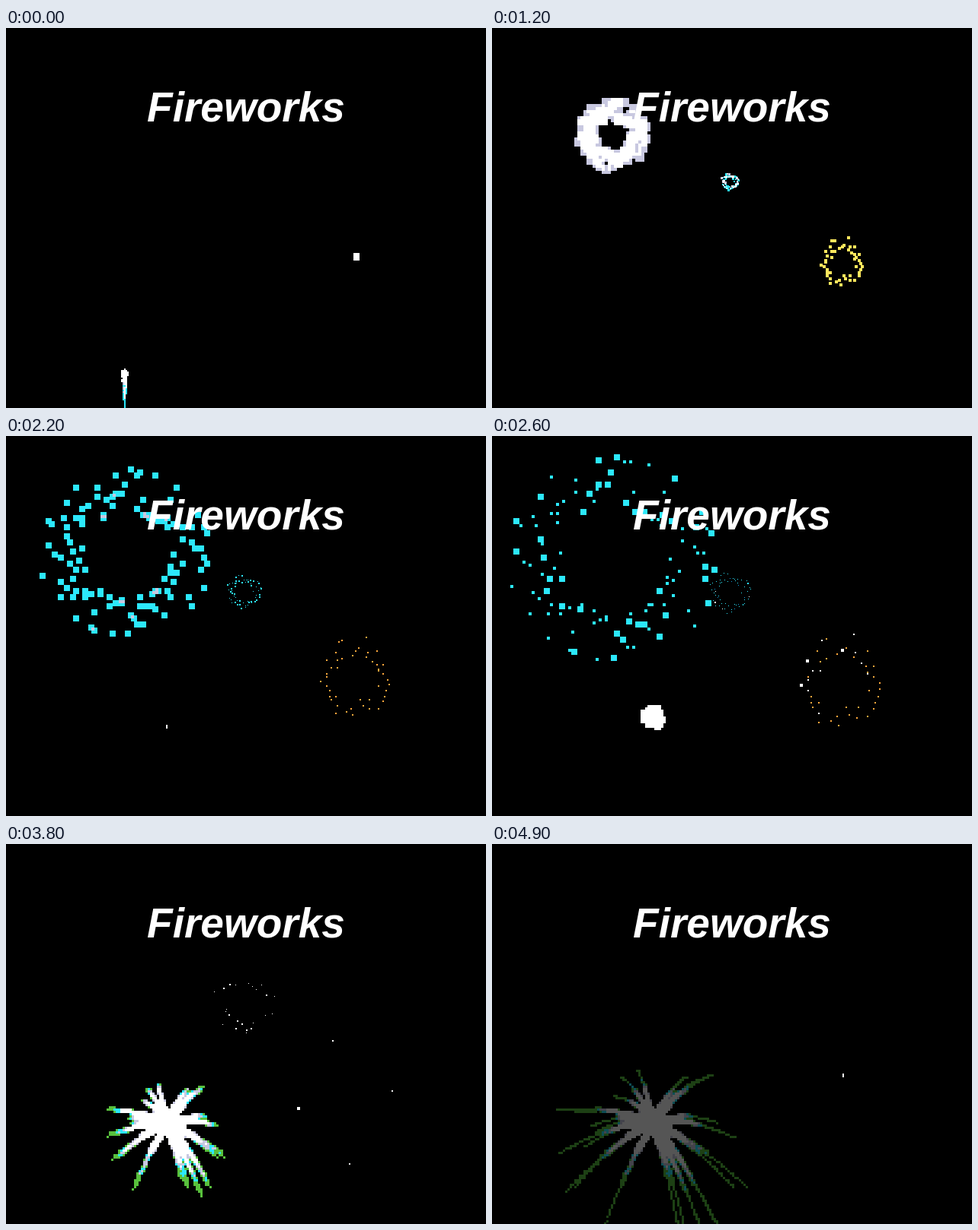
Recreate the animation shown at these times as an HTML page with a canvas. Size 630 px wide and 500 px high, loop 5 s.

```html
<!DOCTYPE html>
<html lang="en">
<head>
<meta charset="utf-8">
<title>Fireworks</title>
<style>
html, body { margin: 0; width: 100%; height: 100%; overflow: hidden; background: #000; }
canvas { display: block; }
</style>
</head>
<body>
<canvas id="stage" width="630" height="500"></canvas>
<script>
const ctx = document.getElementById('stage').getContext('2d');
const LOOP = 5000, STEP = 100;
const WHITE = '#ffffff', LAVENDER = '#c8c8e0', CYAN = '#2ce8fc', GREEN = '#58c03c';

function seeded(seed) {
  return () => {
    seed = (seed + 0x6D2B79F5) | 0;
    let v = Math.imul(seed ^ (seed >>> 15), 1 | seed);
    v = (v + Math.imul(v ^ (v >>> 7), 61 | v)) ^ v;
    return ((v ^ (v >>> 14)) >>> 0) / 4294967296;
  };
}

// Heat levels: [upper limit, colour], from cold to hot.
const blueHeat = [[0.9, '#0c98dc'], [3, CYAN], [3.6, LAVENDER], [Infinity, WHITE]];
const goldHeat = [[1.25, '#ffa83c'], [4.6, '#ffe65c'], [Infinity, WHITE]];
const trailHeat = [[2.2, GREEN], [3.2, CYAN], [5, LAVENDER], [Infinity, WHITE]];

const bursts = [
  { x: 460, y: 301, start: -50, cell: 2, count: 45, kick: 4, speed: 0.0225, fall: 1.55e-4,
    life: [2900, 1050], flash: [2450, 600], heat: goldHeat, seed: 11 },
  { x: 158, y: 138, start: 700, cell: 4, count: 110, kick: 14, speed: 0.066, fall: 3.4e-4,
    life: [2350, 700], flash: [9000, 0], heat: blueHeat, seed: 5 },
  { x: 312, y: 201, start: 400, cell: 1, count: 60, kick: 2, speed: 0.012, fall: 0.5e-4,
    life: [2600, 1350], flash: [2100, 700], heat: blueHeat, seed: 23 }
];
for (const b of bursts) {
  const rnd = seeded(b.seed);
  b.sparks = Array.from({ length: b.count }, (_, i) => {
    const a = (i + rnd()) / b.count * 2 * Math.PI, v = 0.5 + 0.5 * rnd();
    return {
      vx: Math.cos(a) * v, vy: Math.sin(a) * v,
      aging: 0.8 + 0.4 * rnd(), warmth: 0.9 + 0.4 * rnd(),
      life: b.life[0] + b.life[1] * rnd(),
      flash: b.flash[0] + b.flash[1] * rnd(),
      big: rnd() < 0.35
    };
  });
}

// Directions of the trailing burst, as offsets at unit reach 77.
const rays = [
  [-12, -70], [-25, -65], [-31, -49], [27, -65], [48, -67], [36, -62], [-77, -38],
  [-62, -36], [-50, -25], [-76, -3], [-54, -9], [-70, 28], [-62, 23], [-43, 66],
  [52, -28], [66, -16], [55, -20], [76, 24], [65, 24], [57, 64], [46, 75],
  [52, 54], [36, 50], [20, 54], [28, 64], [40, 32], [-46, -20]
];

function addHeat(map, cell, x, y, n, h) {
  const cx = Math.round(x / cell - n / 2), cy = Math.round(y / cell - n / 2);
  for (let j = 0; j < n; j++) {
    for (let i = 0; i < n; i++) {
      const key = (cy + j + 500) * 2000 + cx + i + 500;
      map.set(key, (map.get(key) || 0) + h);
    }
  }
}

function paintHeat(map, cell, levels) {
  for (const [key, h] of map) {
    ctx.fillStyle = levels.find(l => h < l[0])[1];
    ctx.fillRect((key % 2000 - 500) * cell, (Math.floor(key / 2000) - 500) * cell, cell, cell);
  }
}

const reach = (t, kick, speed) => kick * (1 - Math.exp(-t / 200)) + speed * t;

function drawBurst(b, time) {
  const t = time - b.start;
  if (t < 0) return;
  const map = new Map();
  const r = reach(t, b.kick, b.speed), drop = b.fall * t ** 1.5;
  for (const s of b.sparks) {
    if (t > s.life) continue;
    const age = t * s.aging;
    let n = age < 750 ? 3 : age < 1800 ? 2 : 1;
    let h = Math.min(3.4, 2100 / (t + 1) * s.warmth);
    if (t > s.flash) {
      n = s.big ? 2 : 1;
      h = 9;
    }
    addHeat(map, b.cell, b.x + s.vx * r, b.y + s.vy * r + drop, n, h);
  }
  paintHeat(map, b.cell, b.heat);
}

function drawTrails(time) {
  const t = time - 2500;
  if (t < 0) return;
  const map = new Map();
  for (let s = 0; s <= t; s += 50) {
    const r = reach(s, 20, 0.044) / 77, drop = 3.63e-4 * s ** 1.5;
    const n = s < 450 ? 3 : s < 1250 ? 2 : 1;
    const h = 1.2 * (1000 / (s + 50)) ** 1.5;
    for (const [dx, dy] of rays) addHeat(map, 3, 211 + dx * r, 370 + dy * r + drop, n, h);
  }
  ctx.globalAlpha = Math.min(1, (5200 - time) / 900);
  paintHeat(map, 3, trailHeat);
  ctx.globalAlpha = 1;
}

function drawDot(time, x, top, rise, end, span, w, h) {
  const left = (end - time) / span;
  if (left <= 0 || left > 1) return;
  ctx.fillStyle = left > 0.95 ? '#aaaaaa' : WHITE;
  ctx.fillRect(x, Math.round(top + rise * left ** 1.5), w, h);
}

function drawRocket(time) {
  if (time >= 700) return;
  const y = 448 - Math.round(0.43 * time);
  const box = (color, x, dy, w, h) => {
    ctx.fillStyle = color;
    ctx.fillRect(x, y + dy, w, h);
  };
  box(CYAN, 155, 32, 2, 24);
  box(CYAN, 153, 32, 4, 10);
  box(WHITE, 155, 0, 2, 2);
  box(WHITE, 151, 2, 8, 10);
  box(WHITE, 159, 4, 2, 6);
  box(WHITE, 153, 12, 6, 10);
  box(WHITE, 151, 14, 2, 4);
  box(WHITE, 155, 20, 4, 14);
  box(LAVENDER, 153, 18, 2, 14);
  box(CYAN, 157, 26, 2, 8);
  box(CYAN, 153, 22, 4, 2);
  box(CYAN, 153, 28, 2, 2);
  box(WHITE, 155, 34, 2, 6);
}

function drawTitle() {
  ctx.fillStyle = WHITE;
  ctx.font = 'italic bold 55px "Liberation Sans", Arial, sans-serif';
  ctx.textAlign = 'center';
  ctx.fillText('Fireworks', 315, 123);
}

function frame(now) {
  const time = Math.floor(now % LOOP / STEP) * STEP;
  ctx.fillStyle = '#000';
  ctx.fillRect(0, 0, 630, 500);
  for (const b of bursts) drawBurst(b, time);
  drawTrails(time);
  drawRocket(time);
  drawDot(time, 210, 370, 35, 2500, 701, 2, 5);
  drawDot(time, 460, 301, 35, 4950, 700, 2, 5);
  drawDot(time, 312, 201, 12, 400, 350, 1, 3);
  drawTitle();
}

const origin = performance.now();
function tick() {
  frame(performance.now() - origin);
  requestAnimationFrame(tick);
}
tick();
</script>
</body>
</html>
```
